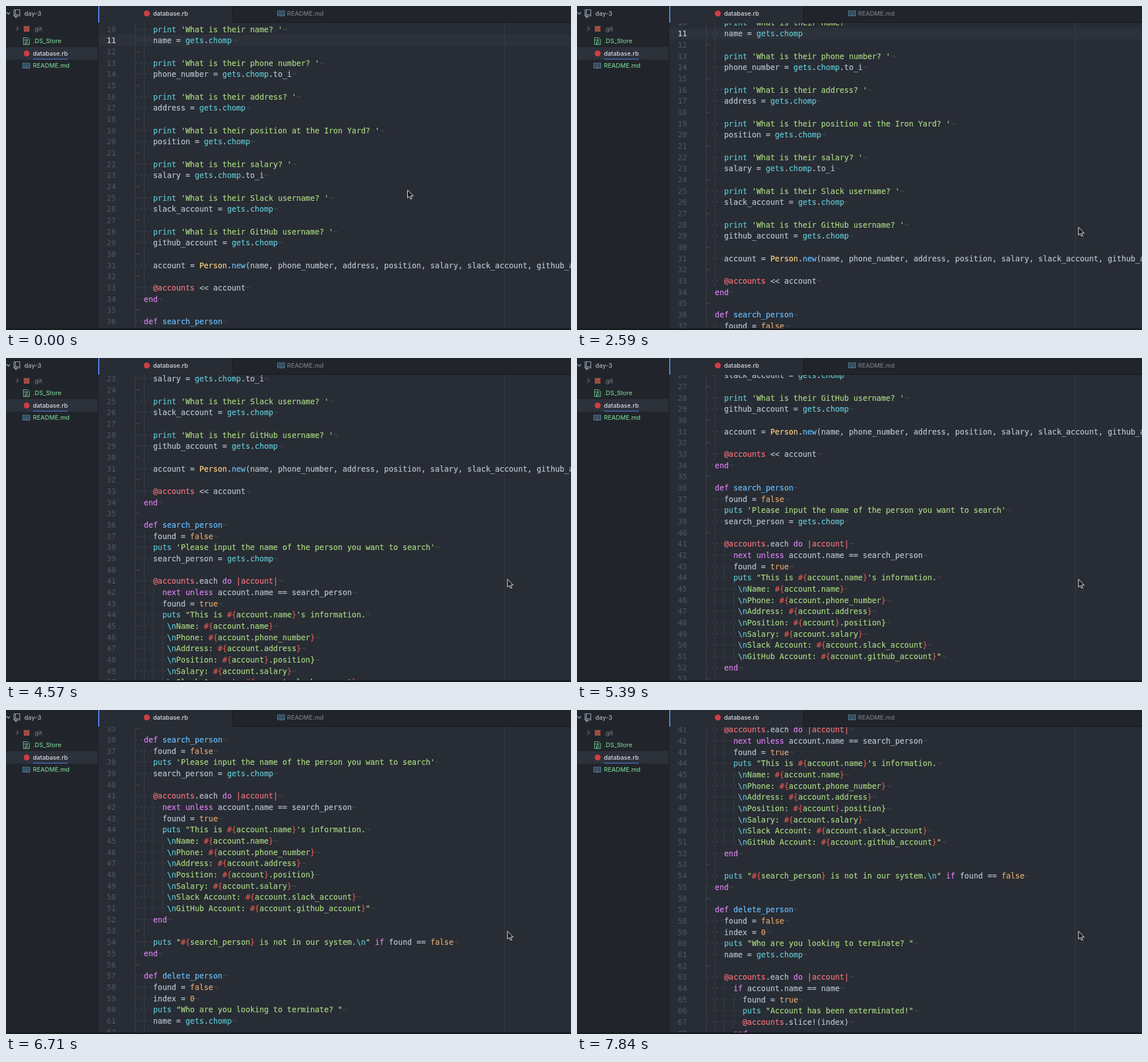
Animation of 987x567 px, one loop 7990 ms. Source, as an HTML page:

```html
<!DOCTYPE html>
<html lang="en">
<head>
<meta charset="utf-8">
<title>Editor scroll</title>
<style>
html, body { margin: 0; width: 100%; height: 100%; overflow: hidden; background: #21252b; }
body { position: relative; font: 500 10.65px/16px Inter, Roboto, sans-serif; }
body > *, #code div *, .line i { position: absolute; }
.label { white-space: pre; }
#editor { left: 161px; top: 30px; right: 0; bottom: 3px; overflow: hidden; background: #282c34; }
#code { position: absolute; left: 0; top: .6px; width: 100%; -webkit-text-stroke: .2px;
  font: 13.42px/19.672px "DejaVu Sans Mono", "Liberation Mono", monospace; color: #bcc3cf; }
#code .line { position: relative; height: 19.672px; white-space: pre; }
#code .line.current { background: #2c313a; }
#code .num, #code .text { top: 1px; }
#code .num { left: 15px; color: #495162; }
#code .current .num { color: #c5cad4; }
#code .line i { top: 0; width: 1px; height: 20px; background: #3b4049; }
#code .text { left: 63.7px; }
#code .text * { position: static; font-weight: 400; }
#code .mark { color: #3f444d; }
.str { color: #a8d782; } .fn { color: #5ec7d3; } .key { color: #d981f0; }
.name { color: #68bfff; } .var { color: #f2737c; } .lit { color: #e3a76f; }
.type { color: #fdd283; } .hash { color: #da594e; }
#wrap { left: 870px; top: 30px; width: 1px; height: 534px; background: #383c44; }
svg { left: 0; top: 0; width: 987px; height: 567px; }
#foot { left: 0; right: 0; bottom: 0; height: 3px; background: #191b20; }
</style>
</head>
<body>
<div id="editor"><div id="code"></div></div>
<div id="wrap"></div>
<div id="foot"></div>
<svg viewBox="0 0 987 567" fill="none">
  <defs>
    <g id="book" stroke="#5b9fc0">
      <path d="M.5 1H5.5L6.5 2L7.5 1H12.5V9.5H7.5L6.5 10.5L5.5 9.5H.5ZM6.5 2V10"/>
      <path d="M2 3.5H5M2 5.5H5M2 7.5H5M8 3.5H11M8 5.5H11M8 7.5H11" stroke-width=".8"/>
    </g>
  </defs>
  <path d="M0 72H160V94H0Z" fill="#2c313a"/>
  <path d="M161 0H395V30H161Z" fill="#282c34"/>
  <path d="M160.5 0V564M395.5 0V29M395 28.5H987" stroke="#181a1f"/>
  <path d="M161 0H163V29H161Z" fill="#568af2"/>
  <path d="M47 93H108" stroke="#568af2"/>
  <path d="M1 11L4 14.5L7 11M14 6.5H24V17.5H19M14 6.5V17.5H15.5M16.5 7V15M14 15H24M16 16V20L17.2 19L18.5 20V16" stroke="#9da5b4" stroke-width="1.2"/>
  <path d="M18 36L21.5 39.5L18 43" stroke="#6b717d" stroke-width="1.2"/>
  <path d="M31 35H41V45H31Z" fill="#a04b3e"/>
  <g fill="#cc3e44"><circle cx="36" cy="83" r="5.2"/><circle cx="246" cy="13" r="5.2"/></g>
  <path d="M30.5 55.5H38L41 58.5V67.5H30.5ZM33 58V61.5M35.5 58.5H37.5V61.5H35.5ZM33.5 63.5H35.5V66H33.5ZM38 63V66" stroke="#73c990"/>
  <use href="#book" x="29" y="99"/>
  <use href="#book" x="474" y="7.5"/>
  <path id="pointer" d="M0 0V14L3.2 11.2L5.4 16L7.7 15L5.5 10.3H10Z" fill="#17181b" stroke="#f4f4f4"/>
</svg>
<script>
const LOOP = 7990, FIRST = 10, CURRENT = 11;
const source = String.raw`    print 'What is their name? '
    name = gets.chomp

    print 'What is their phone number? '
    phone_number = gets.chomp.to_i

    print 'What is their address? '
    address = gets.chomp

    print 'What is their position at the Iron Yard? '
    position = gets.chomp

    print 'What is their salary? '
    salary = gets.chomp.to_i

    print 'What is their Slack username? '
    slack_account = gets.chomp

    print 'What is their GitHub username? '
    github_account = gets.chomp

    account = Person.new(name, phone_number, address, position, salary, slack_account, github_account)

    @accounts << account
  end

  def search_person
    found = false
    puts 'Please input the name of the person you want to search'
    search_person = gets.chomp

    @accounts.each do |account|
      next unless account.name == search_person
      found = true
      puts "This is #{account.name}'s information.
       \nName: #{account.name}
       \nPhone: #{account.phone_number}
       \nAddress: #{account.address}
       \nPosition: #{account}.position}
       \nSalary: #{account.salary}
       \nSlack Account: #{account.slack_account}
       \nGitHub Account: #{account.github_account}"
    end

    puts "#{search_person} is not in our system.\n" if found == false
  end

  def delete_person
    found = false
    index = 0
    puts "Who are you looking to terminate? "
    name = gets.chomp

    @accounts.each do |account|
      if account.name == name
        found = true
        puts "Account has been exterminated!"
        @accounts.slice!(index)
      end`;

// Syntax colouring
const paint = (cls, s) => s.replace(/[^\n]+/g, m => `<b class="${cls}">${m}</b>`);
const paintString = s => s.split(/(#\{[^}]*\}|\\n)/).map(p =>
  p === "\\n" ? paint("fn", p)
  : p.startsWith("#{") ? paint("hash", "#{") + paint("str", p.slice(2, -1)) + paint("hash", "}")
  : paint("str", p)).join("");
const rules = [
  [/^['"]/, paintString],
  [/^(print|puts|gets|chomp)$/, s => paint("fn", s)],
  [/^def /, s => paint("key", "def") + " " + paint("name", s.slice(4))],
  [/^(end|do|next|unless|if)$/, s => paint("key", s)],
  [/^(true|false|0)$/, s => paint("lit", s)],
  [/^[@|]/, s => paint("var", s)],
  [/^Person$/, s => paint("type", s)],
  [/^new$/, s => paint("name", s)],
  [/^<</, () => "&lt;&lt;"]
];
const tokens = /'[^']*'|"[^"]*"|def \w+|@\w+|\|\w+\||\w+|<</g;
const highlight = s => s.replace(tokens, t => {
  const rule = rules.find(([test]) => test.test(t));
  return rule ? rule[1](t) : t;
});

// Lines with numbers, indent guides and invisible marks
const raw = source.split("\n");
const indents = raw.map(s => s.search(/\S|$/));
const painted = highlight(raw.map(s => s.trimStart()).join("\n")).split("\n");
const code = document.getElementById("code");
code.innerHTML = painted.map((html, i) => {
  const depth = Math.ceil((raw[i] ? indents[i] : indents[i + 1]) / 2);
  let guides = "";
  for (let g = 0; g < depth; g++) guides += `<i style="left:${64 + 16 * g}px"></i>`;
  const n = FIRST + i;
  return `<div class="line${n === CURRENT ? " current" : ""}"><span class="num">${n}</span>${guides}` +
    `<span class="text"><span class="mark">${"·".repeat(indents[i])}</span>${html}<span class="mark">¬</span></span></div>`;
}).join("");

// Sidebar and tab labels: text, x, centre y, colour
[["day-3", 32, 13, "#aab1be"], [".git", 47, 40, "#737984"], [".DS_Store", 47, 61, "#73c990"],
 ["database.rb", 47, 83, "#d7dae0"], ["README.md", 47, 104, "#73c990"],
 ["database.rb", 257, 13, "#d7dae0"], ["README.md", 491, 13, "#737984"]
].forEach(([text, x, y, color]) => {
  const el = document.createElement("div");
  el.className = "label";
  el.textContent = text;
  el.style.cssText = `left:${x}px;top:${y - 7.5}px;color:${color}`;
  document.body.append(el);
});

// Motion: each swipe is a short burst of steps that slows down
const step = (t, start, gap, levels) =>
  t < start ? 0 : levels[Math.min(levels.length - 1, Math.floor((t - start) / gap))];
const swipe = [.1, .45, .72, .9, 1];
const nudges = [740, 1520, 1690];
// start, time between steps, distance
const swipes = [
  [2470, 157, 100.6], [3400, 172.5, 113.7], [4390, 177.5, 98.2],
  [5390, 172.5, 115], [6380, 165, 98.6], [7330, 170, 97.7]
];
const pointer = document.getElementById("pointer");

function draw(now) {
  const t = now % LOOP;
  let y = nudges.filter(n => t >= n).length * .5;
  for (const [start, gap, distance] of swipes) y += distance * step(t, start, gap, swipe);
  code.style.transform = `translateY(${-y}px)`;
  const p = step(t, 1990, 160, [.3, .75, 1]);
  pointer.setAttribute("transform", `translate(${701.5 + 174.5 * p} ${322 + 65 * p})`);
  requestAnimationFrame(draw);
}
draw(performance.now());
</script>
</body>
</html>
```
